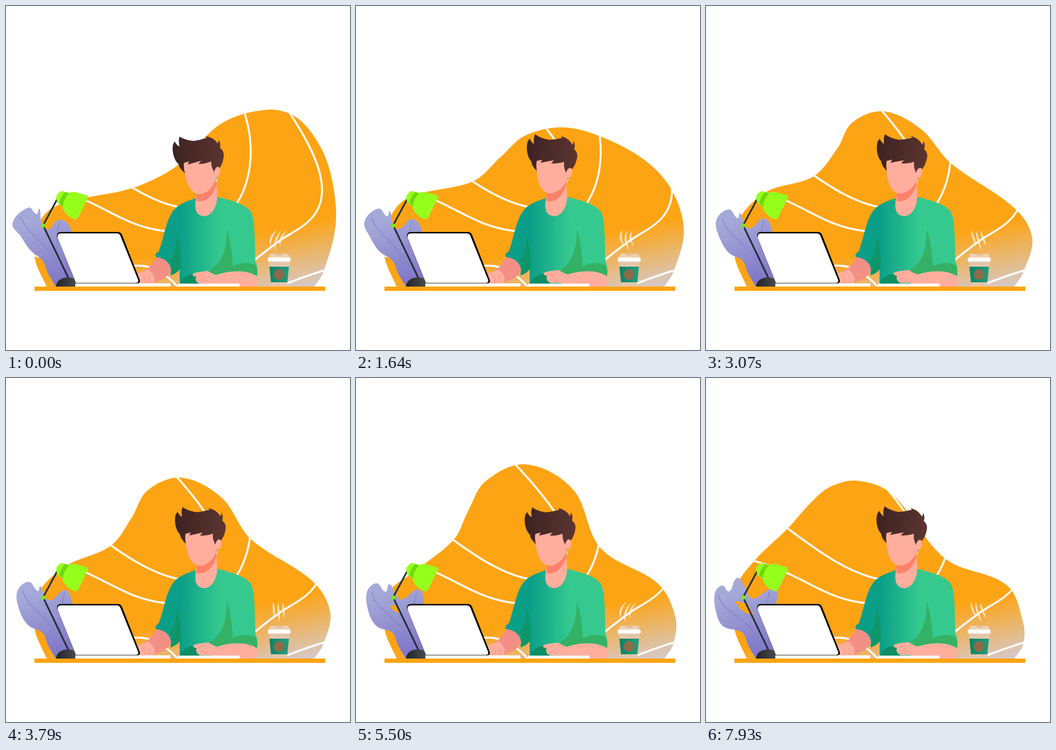
An HTML page for the animation above (8 s loop, 640x640 px).

```html
<!DOCTYPE html>
<html lang="en">
<head>
<meta charset="utf-8">
<title>Working at the desk</title>
<style>
  html, body { margin: 0; height: 100%; overflow: hidden; background: #fff; }
  svg { display: block; width: 100vw; height: 100vh; }
</style>
</head>
<body>
<svg viewBox="0 0 640 640">
  <defs>
    <linearGradient id="blobFill" gradientUnits="userSpaceOnUse" x1="551" y1="404" x2="577" y2="526">
      <stop stop-color="#fda414"/><stop offset="1" stop-color="#d3cbd3"/>
    </linearGradient>
    <linearGradient id="leafFill" gradientUnits="userSpaceOnUse" x1="50" y1="400" x2="95" y2="520">
      <stop stop-color="#a5a9d8"/><stop offset="1" stop-color="#7f74c6"/>
    </linearGradient>
    <linearGradient id="shirtFill" gradientUnits="userSpaceOnUse" x1="325" y1="0" x2="398" y2="0">
      <stop stop-color="#0b9f88"/><stop offset="1" stop-color="#35c98f"/>
    </linearGradient>
    <linearGradient id="hairFill">
      <stop stop-color="#3c2222"/><stop offset="1" stop-color="#5c3531"/>
    </linearGradient>
    <linearGradient id="baseFill">
      <stop stop-color="#222426"/><stop offset="1" stop-color="#4a4b4e"/>
    </linearGradient>
    <linearGradient id="cupFill">
      <stop stop-color="#0c8266"/><stop offset="1" stop-color="#239d7d"/>
    </linearGradient>
    <clipPath id="blobClip"><path id="blobEdge"/></clipPath>
  </defs>

  <path id="blob" fill="url(#blobFill)"/>
  <g clip-path="url(#blobClip)" fill="none" stroke="#fff" stroke-width="3.6">
    <path d="M288 152Q340 206 371 251"/>
    <path d="M443 196C459 245 464 312 429 368"/>
    <path d="M527 198C553 237 588 295 588 342C588 400 540 415 510 436Q488 452 462 473"/>
    <path d="M140 271C205 320 265 364 322 374"/>
    <path d="M80 338C180 362 215 412 300 419"/>
    <path d="M50 464Q66 466 80 474"/>
    <path d="M234 484C270 478 300 500 320 523"/>
    <path d="M518 518Q555 503 598 490"/>
  </g>

  <!-- plant -->
  <path id="leaf" fill="url(#leafFill)"/>
  <path id="gap" fill="#fda414" d="M54 414Q66 419 76 418L88 440Q66 440 54 414Z"/>
  <g fill="none" stroke="#8c80cc" stroke-width="1.4">
    <path id="veinFront"/><path id="veinBack"/>
  </g>

  <!-- lamp -->
  <path d="M96 358L69 408L119 512" fill="none" stroke="#263038" stroke-width="3.2"/>
  <circle cx="69" cy="408.5" r="4" fill="#7be412"/>
  <path d="M94 353Q98 346 104 344L117 348Q123 345 129 346L150 352Q154 354 152 358L134 394Q131 399 126 396Q108 388 105 373L97 367Q92 360 94 353Z" fill="#96ff1c"/>
  <path d="M110 346L118 348Q107 358 106 373L99 367Q101 355 110 346Z" fill="#70d80d"/>
  <path d="M93 522C95 502 122 502 130 510V522Z" fill="url(#baseFill)"/>

  <!-- left arm -->
  <path d="M280 467C271 483 263 490 255 493L272 515C292 510 306 502 307 488V470Z" fill="#f48f86"/>
  <path d="M245 497Q258 494 265 490Q275 498 277 507L274 516H248Z" fill="#ffae9d"/>
  <path d="M255 502Q260 506 259 515M265 502Q269 507 267 515" fill="none" stroke="#f48f86"/>

  <!-- torso -->
  <path d="M354 357C337 363 321 368 311 381C297 400 293 435 284 457Q276 460 279 467Q303 470 307 490L306 501Q317 498 323 489V517H385L467 505C469 485 466 482 464 475C463 430 463 395 455 382C444 368 420 362 393 355Z" fill="url(#shirtFill)"/>
  <path d="M318 426Q327 460 325 488Q317 498 306 501Q311 480 303 472Q316 468 318 426Z" fill="#0d9669"/>
  <path d="M323 517Q331 499 352 498L362 517Z" fill="#0c9063"/>
  <path d="M411 414C411 450 403 482 374 494L398 502C425 490 450 492 466 503Q470 490 464 482Q445 473 422 484C421 460 417 435 411 414Z" fill="#34b164"/>
  <path d="M354 352L353 360C350 380 355 391 370 391C388 389 393 365 393 355L391 318Z" fill="#ffae9d"/>
  <path d="M354 350L391 317L392 331C385 354 371 366 355 363Z" fill="#ff8169"/>

  <!-- right arm -->
  <path d="M378 506C410 490 450 490 467 503Q469 518 463 522H435V517H382Z" fill="#ffae9d"/>
  <g id="hand">
    <path d="M347 499Q350 495 376 493Q386 500 398 503L385 517H360Q350 512 354 503Q348 504 347 499Z" fill="#ffae9d"/>
    <path d="M356 503Q364 502 369 498M360 511Q364 507 369 506M367 515Q370 511 375 510" fill="none" stroke="#f48f86"/>
  </g>

  <g id="head">
    <path d="M391 316L394 318L392 328Z" fill="#3c2222"/>
    <path d="M330 288C332 320 339 346 357 350C373 351 388 336 391 318L390 285L360 275Z" fill="#ffae9d"/>
    <path d="M333 311Q322 302 321 294C312 287 308 268 311 257L314 252Q318 260 323 261Q320 250 323 243Q334 250 350 251Q362 249 374 245L371 242Q386 244 394 256L396 249Q400 257 398 264Q406 269 405 279C404 293 398 304 388 310Q381 299 382 289Q371 294 358 294L363 288Q352 291 338 295L341 289L331 292Q330 302 333 311Z" fill="url(#hairFill)"/>
    <ellipse cx="393" cy="309" rx="5.5" ry="10" fill="#ffae9d" transform="rotate(10 393 309)"/>
    <path d="M393 319L391 328" stroke="#fff" stroke-width="1.5"/>
  </g>

  <!-- laptop, notebook, desk -->
  <path d="M102 420.5H208Q214 420.5 216 426L249 510Q250 516 244 516H130L95 429Q94 420.5 102 420.5Z"/>
  <path d="M102 423H206Q211 423 213 428L246 510Q247 515 242 515H130L96 431Q95 423 102 423Z" fill="#fff"/>
  <path d="M129 516H306V522H129ZM320 516.5H434.5V522H320Z" fill="#fff"/>
  <path d="M129 516H242" stroke="#cfcfcf" stroke-width=".6"/>
  <path d="M53 522H594V530H53Z" fill="#fda414"/>

  <!-- coffee -->
  <path d="M489 475H528L523 522H494Z" fill="#e3c6ab"/>
  <path d="M492 461H525L528 468H489Z" fill="#edd0b3"/>
  <path d="M503 462H514V464H503Z" fill="#d9b594"/>
  <rect x="487" y="468" width="42.5" height="7.5" rx="1.5" fill="#fff"/>
  <path d="M490 485H526.5L523.5 514H493Z" fill="url(#cupFill)"/>
  <circle cx="508" cy="499.5" r="10" fill="#8a6b4a"/>
  <path id="steam" fill="#fff0dc" opacity=".85"/>
</svg>

<script>
const LOOP = 8000;

// Key poses: a time and the x, y pairs of the moving outline points.
const blobPoses = [
  { time: 0,    points: [62,402, 100,369, 237,338, 320,296, 400,219, 485,193, 540,207, 585,262, 608,330, 613,410] },
  { time: 1640, points: [57,408, 95,358, 218,326, 268,282, 315,241, 390,226, 470,249, 545,293, 590,347, 610,420] },
  { time: 3070, points: [55,408, 110,347, 200,317, 245,264, 272,217, 330,196, 400,229, 455,292, 575,377, 607,432] },
  { time: 6035, points: [60,400, 110,362, 178,297, 200,245, 235,186, 314,153, 405,203, 455,322, 560,385, 592,450] },
  { time: 7930, points: [55,392, 90,340, 152,280, 196,231, 230,203, 280,191, 345,215, 445,336, 560,386, 590,455] }
];
const leafPoses = [
  { time: 0,    points: [44,453, 28,429, 12,404, 42,375, 57,387, 62,377, 66,404, 78,416, 97,398, 116,406] },
  { time: 4430, points: [42,462, 26,437, 22,397, 42,380, 60,398, 64,389, 74,408, 85,413, 109,394, 119,402] },
  { time: 7930, points: [32,462, 20,440, 16,402, 30,386, 43,397, 58,372, 71,386, 86,410, 116,394, 133,392] }
];

const el = id => document.getElementById(id);
const setPath = (id, d) => el(id).setAttribute('d', d);
const setTransform = (id, value) => el(id).setAttribute('transform', value);

function tween(poses, t) {
  const next = Math.max(1, poses.findIndex(pose => pose.time > t));
  const i = t >= poses.at(-1).time ? poses.length - 1 : next;
  const [from, to] = [poses[i - 1], poses[i]];
  const k = (t - from.time) / (to.time - from.time);
  return from.points.map((v, j) => v + (to.points[j] - v) * k);
}

// Spline through the points; handles grow with the segment, so uneven spacing stays smooth.
function smooth(flat) {
  const last = flat.length / 2 - 1;
  const at = i => {
    const j = 2 * Math.max(0, Math.min(last, i));
    return [flat[j], flat[j + 1]];
  };
  const handle = (i, length) => {
    const [a, p, b] = [at(i - 1), at(i), at(i + 1)];
    const scale = length / 3 / Math.hypot(b[0] - a[0], b[1] - a[1]);
    return p.map((v, k) => v + (b[k] - a[k]) * scale);
  };
  let d = 'M' + at(0);
  for (let i = 0; i < last; i++) {
    const [p, q] = [at(i), at(i + 1)];
    const length = Math.hypot(q[0] - p[0], q[1] - p[1]);
    d += `C${handle(i, length)} ${handle(i + 1, -length)} ${q}`;
  }
  return d + 'Z';
}

function steamPath(t) {
  const angle = t / 5300 * 2 * Math.PI;
  const lean = 5 * Math.cos(angle);
  const bend = 4 + 4 * Math.sin(angle);
  let d = '';
  for (let i = 0; i < 3; i++) {
    const x = 498 + 9 * i, top = 416 + i, bottom = i === 1 ? 454 : 447;
    const third = (bottom - top) / 3;
    const [x1, y1, x2, y2] = [x + lean / 4 - bend, top + third, x - lean - bend, bottom - third];
    d += `M${x + lean} ${top}C${x1 - 2.5} ${y1} ${x2 - 2.5} ${y2} ${x - lean} ${bottom}` +
         `C${x2 + 2.5} ${y2} ${x1 + 2.5} ${y1} ${x + lean} ${top}Z`;
  }
  return d;
}

function draw(t) {
  const outline = smooth([76,523, 53,466, ...tween(blobPoses, t), 590,496, 573,523]);
  setPath('blob', outline);
  setPath('blobEdge', outline);

  const leaf = tween(leafPoses, t);
  const [tipX, topX, topY] = [leaf[4], leaf[6], leaf[7]];
  const [lobeX, lobeY] = leaf.slice(16, 18);
  setPath('leaf', smooth([92,521, 78,497, 68,474, ...leaf, 126,440, 128,521]));
  setPath('veinFront', `M${(tipX + topX) / 2} ${topY + 17}C${topX} ${topY + 55} 84 440 112 512`);
  setPath('veinBack', `M${lobeX + 2} ${lobeY + 4}Q${lobeX - 7} 430 100 500`);
  const gap = Math.min(1, Math.max(0, (t - 4200) / 2000));
  setTransform('gap', `translate(78 434) scale(${gap}) translate(-78 -434)`);

  const nod = Math.abs(Math.sin(Math.PI * t / 4700)) ** 1.3;
  setTransform('head', `rotate(${6.5 * nod} 375 345)`);
  setTransform('hand', `translate(${2 * nod} ${-2 * nod})`);
  setPath('steam', steamPath(t));
}

const start = performance.now();
function frame() {
  draw((performance.now() - start) % LOOP);
  requestAnimationFrame(frame);
}
frame();
</script>
</body>
</html>
```
